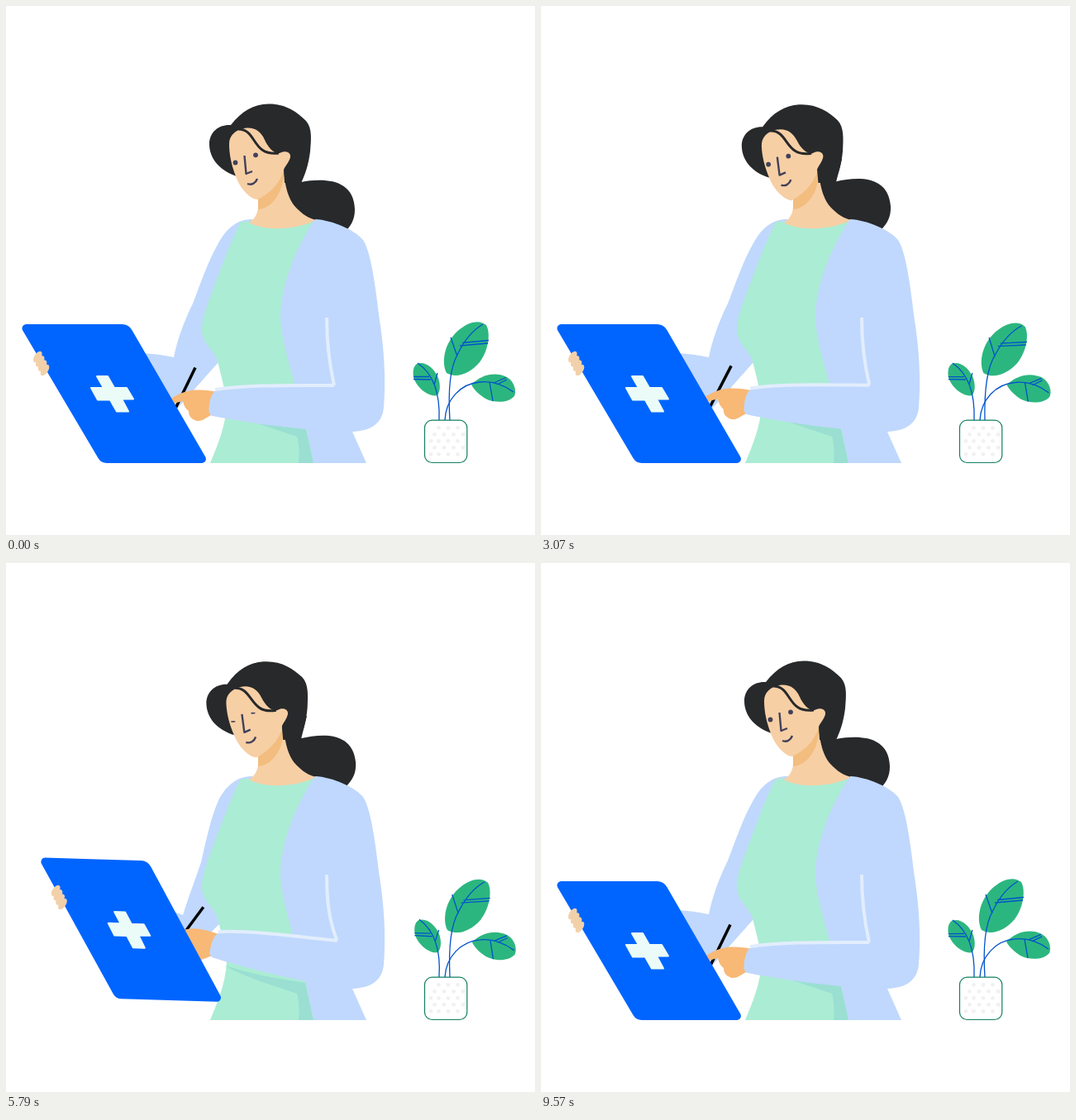
An HTML page with a canvas that plays this animation: 640 by 640 pixels, repeating every 9640 ms.

```html
<!DOCTYPE html>
<html lang="en">
<head>
<meta charset="utf-8">
<title>Woman with clipboard</title>
<style>
  html, body { margin: 0; width: 100%; height: 100%; overflow: hidden; background: #fff; }
  canvas { display: block; width: 100%; height: 100%; }
</style>
</head>
<body>
<canvas id="stage" width="640" height="640"></canvas>
<script>
const ctx = document.getElementById('stage').getContext('2d');
const LOOP = 9640, TAU = Math.PI * 2;
const BLUE = '#0065ff', SLEEVE = '#c0d8fd', SEAM = '#e2edfd', MINT = '#abecd4',
  SHADE = '#9adfd2', HAIR = '#27292b', SKIN = '#f7cfa5', SKIN_DARK = '#f2bd7e',
  HAND = '#f8b876', INK = '#41415a', LEAF = '#2cb67f', VEIN = '#0052cc';

const SHAPES = {
  apron: 'M284 261C272 285 262 312 250 344C242 364 236 384 237 394C240 412 252 416 256 430C260 446 265 464 267 482C266 508 255 534 247 553H374L364 505L350 380L374 259Z',
  shade: 'M265 487C285 500 318 509 352 521C355 532 355 543 354 553H372L362 508C330 503 295 497 265 487Z',
  cardigan: 'M374 258C395 259 422 271 432 283C443 300 448 350 452 380C457 412 460 450 457 486C455 505 442 514 419 515L436 553H372L362 505C355 470 332 410 332 375C333 335 352 290 374 258Z',
  forearm: 'M397 459C350 458 295 459 255 464C249 468 247 475 246 482C245 490 245 494 250 496C290 504 345 511 385 514L419 515L440 480Z',
  hand: 'M190 481C202 473 212 467 224 465C236 464 246 465 256 467L250 494C243 497 238 503 231 502C225 500 221 497 221 490C216 486 215 482 214 478C206 480 198 482 190 485Z',
  neck: 'M305 230V244C304 253 300 258 294 262C310 272 350 272 375 259C352 250 338 225 336 195Z',
  neckShade: 'M305 232C322 225 333 210 336 194C338 223 323 245 305 246Z',
  nape: 'M336 190C336 215 341 235 353 246C362 255 370 258 376 259L402 264L384 216L357 213L364 185Z',
  bun: 'M345 215L357 213C385 208 421 209 422 246C422 259 417 267 408 275L376 264Z',
  hair: 'M279 206C258 199 246 184 246 167C246 152 258 143 272 144C285 127 300 119 317 118.5C338 118 352 128 363 139C371 148 369 163 368 176C366 192 362 204 357 214H337L336 195L300 185Z',
  face: 'M270 167C270 156 278 150 288 148C300 146 308 151 313 162C317 171 324 179 331 178C338 174 345 177 344 183C342 190 338 193 336 198C333 211 322 226 304 234C296 234 283 221 278 206C273 193 270 180 270 167Z',
  strand: 'M281 149C304 149 297 182 330 178',
  nose: 'M288.5 181L290.5 203L298 200',
  mouth: 'M292 215C297 217 302 214.5 304 209',
  cross: 'M110 448H123L131 462H146L154 475.5H140L148 490.5H134L126 476.5H111L103 462H118Z',
  bigLeaf: 'M533 444C526 430 531 405 549 391C560 382 573 379 581 386C587 397 583 418 573 431C561 445 545 451 533 444Z',
  bigVeins: 'M537 501C535 470 536 440 546 422C554 405 565 392 577 385M538 401L546 424M552 407.5L584 404.5M549 411L583 408',
  wideLeaf: 'M563 458C575 446 592 442 606 449C615 454 618 466 615 472C608 480 592 481 580 475C572 470 566 464 563 458Z',
  wideVeins: 'M531 501C532 476 550 457 573 455C590 453 603 459 614 467M585 455L589 478M590 456L605 449.5M594 458L606 452',
  smallLeaf: 'M497 433C507 429 518 438 523 450C527 462 524 472 519 471.5C508 471 496 460 493 449C492 441 493 436 497 433Z',
  smallVeins: 'M524 501C525 475 520 447 498 432M493 448.5H512M493 451.5L514 452M522 444L518 458'
};
const paths = Object.fromEntries(
  Object.entries(SHAPES).map(([name, d]) => [name, new Path2D(d)]));

const mix = (a, b, k) => a + (b - a) * k;
const ramp = (t, from, to) => {
  const k = Math.min(1, Math.max(0, (t - from) / (to - from)));
  return k * k * (3 - 2 * k);
};

function fill(name, color) {
  ctx.fillStyle = color;
  ctx.fill(paths[name]);
}

function stroke(path, color, width) {
  ctx.strokeStyle = color;
  ctx.lineWidth = width;
  ctx.stroke(typeof path === 'string' ? paths[path] : path);
}

function turned(angle, x, y, draw) {
  ctx.save();
  ctx.translate(x, y);
  ctx.rotate(angle);
  ctx.translate(-x, -y);
  draw();
  ctx.restore();
}

function ellipse(x, y, rx, ry, angle, color) {
  ctx.fillStyle = color;
  ctx.beginPath();
  ctx.ellipse(x, y, rx, ry, angle, 0, TAU);
  ctx.fill();
}

function drawBackArm(lift) {
  const at = (x0, y0, x1, y1) => [mix(x0, x1, lift), mix(y0, y1, lift)];
  ctx.beginPath();
  ctx.moveTo(298, 258);
  ctx.bezierCurveTo(280, 258, 268, 268, 258, 285);
  ctx.bezierCurveTo(...at(244, 309, 247, 309), ...at(235, 337, 242, 337), ...at(226, 360, 236, 362));
  ctx.bezierCurveTo(...at(215, 382, 228, 386), ...at(207, 405, 220, 406), ...at(203, 425, 214, 426));
  ctx.quadraticCurveTo(...at(185, 421, 207, 423), ...at(165, 420, 196, 420));
  ctx.lineTo(...at(190, 490, 210, 465));
  ctx.lineTo(...at(208, 486, 228, 466));
  ctx.lineTo(...at(257, 431, 259, 436));
  ctx.lineTo(290, 400);
  ctx.closePath();
  ctx.fillStyle = SLEEVE;
  ctx.fill();
}

function drawHead(tilt, blink) {
  turned(-0.04 * tilt, 336, 258, () => {
    fill('hair', HAIR);
    fill('face', SKIN);
    stroke('strand', HAIR, 3);
    ellipse(277.5, 189.5, 2.9, mix(2.9, 0.9, blink), 0, INK);
    ellipse(302, 180.3, 2.9, mix(2.9, 0.9, blink), 0, INK);
    stroke('nose', INK, 2.4);
    stroke('mouth', INK, 2.4);
  });
}

function drawFrontArm(arm, wrist) {
  turned(arm, 417, 490, () => {
    turned(wrist, 248, 475, () => {
      stroke(new Path2D('M229 437.5L203 491'), '#000', 3.5);
      fill('hand', HAND);
    });
    fill('forearm', SLEEVE);
    stroke(new Path2D('M253 464C290 458 345 459 397 459'), SEAM, 4);
  });
  const endX = 397 + 31 * arm, endY = 459 - 20 * arm;
  stroke(new Path2D(`M388 377C388 410 391 432 ${endX} ${endY}`), SEAM, 4);
}

function drawBoard(lift) {
  ctx.save();
  ctx.translate(20.5 * lift, -25.4 * lift);
  turned(0.03 * lift, 128.5, 469, () => {
    ctx.beginPath();
    ctx.moveTo(80, 385);
    ctx.arcTo(148.3, 385, 245.6, 553, 14);
    ctx.arcTo(245.6, 553, 115, 553, 5);
    ctx.arcTo(115, 553, 15.7, 385, 12);
    ctx.arcTo(15.7, 385, 80, 385, 5);
    ctx.closePath();
    ctx.fillStyle = BLUE;
    ctx.fill();
    fill('cross', '#ebfcf8');
    stroke('cross', '#ebfcf8', 2);
    for (let i = 0; i < 4; i++)
      ellipse(38.3 + i * 2.9, 424.5 + i * 5.3, 7.6, 4, -1, '#f2d1aa');
  });
  ctx.restore();
}

function drawPlant(t) {
  const phase = t / LOOP * 2;
  const sway = peak => Math.cos(TAU * (phase - peak));
  const branch = (name, angle, x) => turned(angle, x, 500, () => {
    fill(name + 'Leaf', LEAF);
    stroke(name + 'Veins', VEIN, 1.3);
  });
  branch('big', 0.025 * (1 + sway(0.5)), 537);
  branch('wide', 0.017 * (0.72 + sway(0.38)), 531);
  branch('small', 0.025 * (0.37 + sway(0.31)), 524);

  ctx.beginPath();
  ctx.roundRect(506.5, 501.2, 51.3, 51.3, 9);
  ctx.fillStyle = '#fff';
  ctx.fill();
  for (let row = 0; row < 5; row++)
    for (let x = row % 2 ? 518.5 : 523.5; x < 556; x += 11.5)
      ellipse(x, 510.3 + row * 8, 2.4, 2.4, 0, '#f1f1f2');
  for (let row = 2; row < 5; row += 2)
    ellipse(514, 510.3 + row * 8, 2.4, 2.4, 0, '#f1f1f2');
  ctx.beginPath();
  ctx.roundRect(506.5, 501.2, 51.3, 51.3, 9);
  ctx.strokeStyle = '#118060';
  ctx.lineWidth = 1.2;
  ctx.stroke();
}

function draw(t) {
  const lift = ramp(t, 3600, 4600) - ramp(t, 7400, 8400);
  const tilt = ramp(t, 500, 1500) - ramp(t, 2850, 3850)
    + ramp(t, 4030, 5000) - ramp(t, 7400, 8400);
  const blink = ramp(t, 5600, 5740) - ramp(t, 5820, 5960);
  const lowWriting = t < 3280 ? (1 - Math.cos(TAU * t / 1093.3)) / 2 : 0;
  const highWriting = t > 5080 && t < 7210 ? Math.sin(TAU * (t - 5080) / 710) : 0;
  const arm = 0.11 * lift + 0.03 * lowWriting + 0.006 * highWriting;
  const wrist = 0.073 * lift + 0.25 * lift * (1 - lift)
    + 0.05 * lowWriting + 0.015 * highWriting;

  ctx.fillStyle = '#fff';
  ctx.fillRect(0, 0, 640, 640);
  ctx.lineCap = 'butt';
  ctx.lineJoin = 'round';

  drawBackArm(lift);
  turned(-0.06 * tilt, 345, 225, () => fill('bun', HAIR));
  fill('apron', MINT);
  fill('shade', SHADE);
  fill('neck', SKIN);
  fill('neckShade', SKIN_DARK);
  fill('nape', HAIR);
  fill('cardigan', SLEEVE);
  drawHead(tilt, blink);
  drawFrontArm(arm, wrist);
  drawBoard(lift);
  drawPlant(t);
}

function tick() {
  draw(performance.now() % LOOP);
  requestAnimationFrame(tick);
}
tick();
</script>
</body>
</html>
```
